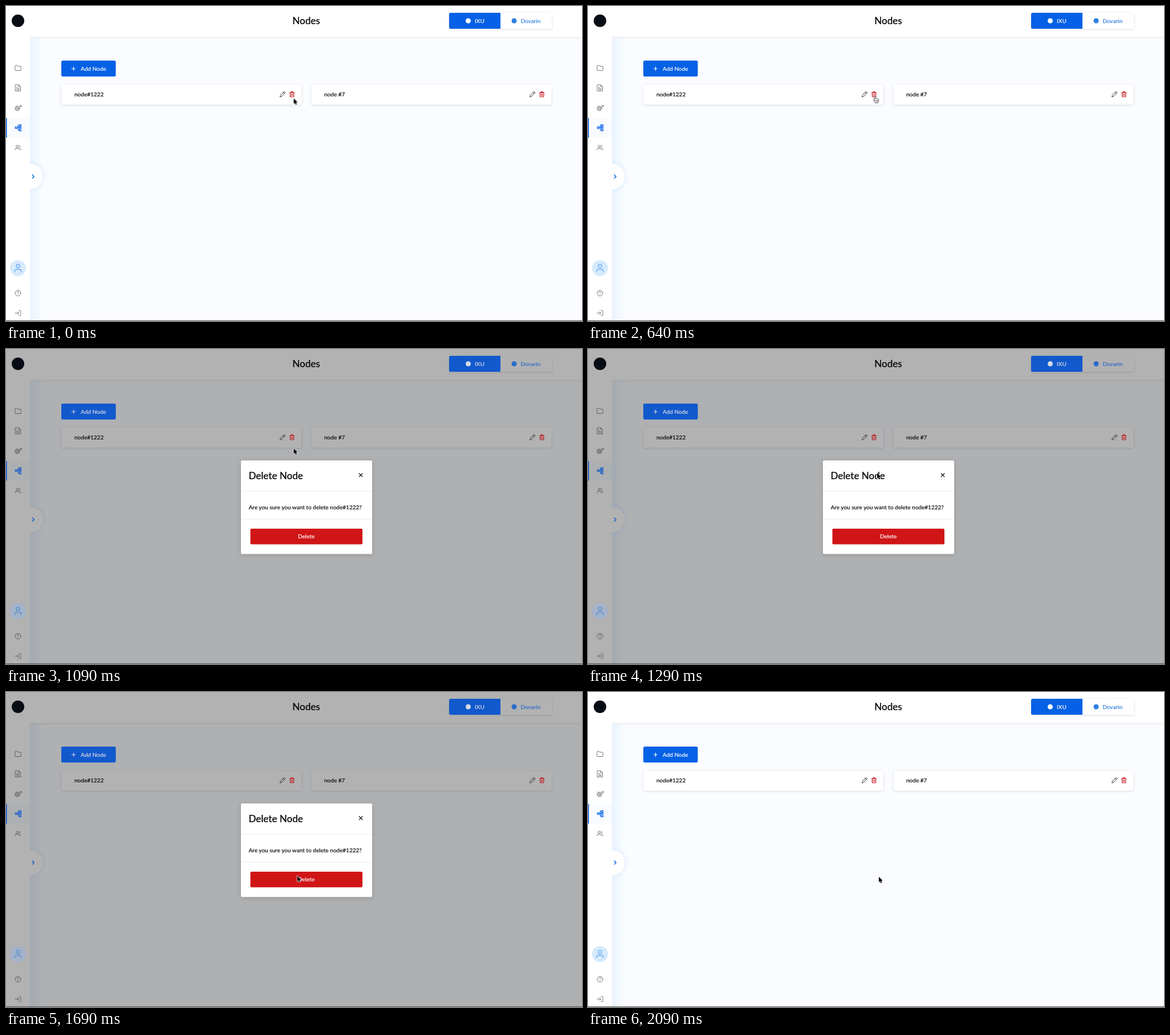
Write an HTML page that moves like this. It is 1010 px wide and 554 px high and loops after 3.64 s.

```html
<!DOCTYPE html>
<html lang="en">
<head>
<meta charset="utf-8">
<title>Nodes</title>
<style>
html, body { margin: 0; width: 100%; height: 100%; overflow: hidden; background: #fafcff; }
svg { display: block; width: 100%; height: 100%; }
#app {
  --blue: #0561e5; --link: #2f80e0; --red: #c60c17; --label: #fff;
  --disc: #d7eafc; --person: #6baef5; --grey: #777;
  animation: tint 3640ms step-end infinite;
}
text { font: 500 10px Lato, "Open Sans", sans-serif; fill: #0b0b0b; stroke: #0b0b0b; stroke-width: .12px; }
text.h { font-size: 17px; stroke-width: .2px; }
text.on { fill: var(--label); stroke: var(--label); }
text.link { fill: var(--link); stroke: var(--link); }
.mid { text-anchor: middle; }
.blue { fill: var(--blue); }
.line { fill: none; stroke: var(--grey); stroke-width: 1; stroke-linecap: round; stroke-linejoin: round; }
.line.b { stroke: var(--blue); }
.panel { fill: #fff; filter: drop-shadow(0 1px 2px rgba(30, 50, 90, .16)); }
#shade, #modal { visibility: hidden; animation: open 3640ms step-end infinite; }
#cursor { animation: move 3640ms linear infinite; }
#arrow { animation: arrow 3640ms step-end infinite; }
#hand { animation: hand 3640ms step-end infinite; }

@keyframes open {
  0%, 57.41%, 100% { visibility: hidden; }
  21.7% { visibility: visible; }
}
@keyframes tint {
  0%, 57.41%, 100% {
    --blue: #0561e5; --link: #2f80e0; --red: #c60c17; --label: #fff;
    --disc: #d7eafc; --person: #6baef5; --grey: #777;
  }
  21.7% {
    --blue: #1259cd; --link: #2c6bcb; --red: #c2121a; --label: #d6dae2;
    --disc: #a2b3ca; --person: #5e8fd0; --grey: #5e5e60;
  }
}
@keyframes arrow {
  0%, 21.7%, 100% { visibility: visible; }
  2.47% { visibility: hidden; }
}
@keyframes hand {
  0%, 21.7%, 100% { visibility: hidden; }
  2.47% { visibility: visible; }
}
@keyframes move {
  0% { transform: translate(504.5px, 162.5px); animation-timing-function: step-end; }
  1.09% { transform: translate(504.5px, 162.5px); animation-timing-function: steps(8, start); }
  12.08% { transform: translate(503.7px, 159.5px); animation-timing-function: step-end; }
  14.83% { transform: translate(503.7px, 159.5px); animation-timing-function: steps(2, start); }
  20.32% { transform: translate(503.5px, 158.8px); animation-timing-function: step-end; }
  29.94% { transform: translate(504.5px, 174.8px); animation-timing-function: step-end; }
  34.06% { transform: translate(504.5px, 174.8px); animation-timing-function: steps(2, start); }
  36.81% { transform: translate(507px, 218px); animation-timing-function: steps(3, start); }
  40.93% { transform: translate(513px, 309px); animation-timing-function: steps(2, start); }
  43.68% { transform: translate(511.5px, 320px); animation-timing-function: steps(4, start); }
  49.17% { transform: translate(510.5px, 324.5px); animation-timing-function: step-end; }
  50.54%, 100% { transform: translate(510px, 325px); }
}
</style>
</head>
<body>
<svg id="app" viewBox="0 0 1010 554">
  <defs>
    <linearGradient id="glow">
      <stop offset="0" stop-color="#e9f3ff"/>
      <stop offset="1" stop-color="#fafcff"/>
    </linearGradient>
    <linearGradient id="under" x2="0" y2="1">
      <stop offset="0" stop-color="#edeff2"/>
      <stop offset="1" stop-color="#edeff2" stop-opacity="0"/>
    </linearGradient>
    <g id="tools">
      <path class="line" style="stroke:#333" d="M.6 9.4l.7-2.9L7.2.7q.6-.5 1.2 0l.9.9q.5.6 0 1.2L3.5 8.6zM6.2 1.7l2.1 2.1"/>
      <path class="line" style="stroke:var(--red);stroke-width:1.1" d="M17.5 2.3h8M19.8 2V.7h3.4V2M18.3 2.5v6q0 1 1 1h4.4q1 0 1-1v-6M20.5 4.6v2.8M22.5 4.6v2.8"/>
    </g>
  </defs>

  <!-- surfaces -->
  <rect width="1010" height="554" fill="#fafcff"/>
  <rect x="42" y="54" width="22" height="500" fill="url(#glow)"/>
  <rect x="42" width="968" height="54" fill="#fff"/>
  <rect x="42" y="54" width="968" height="5" fill="url(#under)"/>
  <circle cx="42" cy="300" r="22.5" fill="#fff" style="filter:drop-shadow(0 0 4px #d3e6fb)"/>
  <rect width="42" height="554" fill="#fff"/>
  <rect y="197" width="42" height="34.5" fill="#f8fbff"/>
  <rect class="panel" x="777" y="12" width="180" height="28" rx="2.5"/>
  <rect class="panel" x="97" y="138.5" width="421" height="35" rx="2"/>
  <rect class="panel" x="535.5" y="138.5" width="421" height="35" rx="2"/>
  <rect id="shade" width="1010" height="554" opacity=".3"/>

  <!-- sidebar -->
  <circle cx="21" cy="26" r="11" fill="#080c14"/>
  <path class="line" d="M15.8 105.3q0-1 1-1h2.7l1.3 1.6h4.4q1 0 1 1v5.6q0 1-1 1h-8.4q-1 0-1-1z"/>
  <path class="line" d="M16.5 138.7h6l3 3v7.8h-9zM22.3 138.7v3.2h3.2M18.5 143.2h2M18.5 145.2h5M18.5 147.2h5"/>
  <g class="line">
    <circle cx="20" cy="180" r="3.2"/>
    <circle cx="20" cy="180" r="1.1"/>
    <circle cx="20" cy="180" r="4.2" stroke-width="1.4" stroke-linecap="butt" stroke-dasharray="1.5 1.8"/>
    <circle cx="26" cy="176" r="1.4"/>
  </g>
  <rect class="blue" y="197" width="1.5" height="34.5"/>
  <path class="line b" stroke-width="1.2" style="stroke-width:1.2" d="M16.4 212.4h3v3h-3zM19.4 213.9h3.8M23.2 209.7h-1.7v8.8h1.7M23.4 208.5h3v2.6h-3zM23.4 212.6h3v2.6h-3zM23.4 217h3v2.6h-3z"/>
  <g class="line">
    <circle cx="19.6" cy="246.8" r="2"/>
    <path d="M16 253v-.8q0-2 2-2h3.2q2 0 2 2v.8M23 244.9q1.6.5 1.6 2t-1.6 2M24.3 250.3q1.7.4 1.7 2v.7"/>
  </g>
  <path class="line b" style="stroke-width:1.5" d="M46.2 297l3 3-3 3"/>
  <circle cx="21" cy="461" r="14" style="fill:var(--disc)"/>
  <g class="line" style="stroke:var(--person);stroke-width:1.4">
    <circle cx="21" cy="457.2" r="3"/>
    <path d="M15.2 467.5v-1.2q0-3 3-3h5.6q3 0 3 3v1.2"/>
  </g>
  <g class="line">
    <circle cx="21" cy="505" r="5"/>
    <path d="M19.5 503.7q.1-1.4 1.5-1.4t1.5 1.3q0 .9-1.5 1.7M21 507.4v.1"/>
    <path d="M16 540h6.3M20 537.6l2.4 2.4-2.4 2.4M22.7 535.5h2.2q1 0 1 1v7q0 1-1 1h-2.2"/>
  </g>

  <!-- header and cards -->
  <text class="h mid" x="526.5" y="32">Nodes</text>
  <path class="blue" d="M779.5 12H867v28h-87.5a2.5 2.5 0 0 1-2.5-2.5v-23a2.5 2.5 0 0 1 2.5-2.5z"/>
  <circle cx="810.5" cy="26" r="4.5" style="fill:var(--label)"/>
  <text class="on" x="822" y="30">IXU</text>
  <circle cx="891" cy="26" r="4.5" style="fill:var(--link)"/>
  <text class="link" x="902.5" y="30">Dovarin</text>
  <rect class="blue" x="97" y="96" width="95.5" height="28" rx="2.5"/>
  <path class="line" style="stroke:var(--label);stroke-width:1.1" d="M115.3 110.2h6.4M118.5 107v6.4"/>
  <text class="on" x="131" y="114">Add Node</text>
  <text x="120" y="159.4">node#1222</text>
  <text x="558" y="159.4">node #7</text>
  <use href="#tools" x="480" y="150.2"/>
  <use href="#tools" x="918.2" y="150.2"/>
  <rect y="553" width="1010" height="1" fill="#555"/>

  <g id="modal">
    <rect x="412" y="196" width="230" height="164.5" rx="2.5" fill="#fff" style="filter:drop-shadow(0 2px 4px rgba(0,0,0,.12))"/>
    <path d="M412 250h230M412 299.3h230" stroke="#ebebeb"/>
    <text class="h" x="425.5" y="228.5">Delete Node</text>
    <path class="line" style="stroke:#111;stroke-width:1.3" d="M619.3 219l5.6 5.6M624.9 219l-5.6 5.6"/>
    <text x="425.5" y="281.6">Are you sure you want to delete node#1222?</text>
    <rect x="428.5" y="316" width="196.5" height="27.5" rx="2" fill="#d01517"/>
    <text class="mid" x="526.7" y="333" style="fill:#fff;stroke:#fff">Delete</text>
  </g>

  <g id="cursor" stroke-linejoin="round">
    <path id="arrow" d="M0 0V9.8L2.2 7.8 3.7 11.2 5.4 10.4 4 7.1H6.9Z" stroke="#fff" stroke-width="1.3" paint-order="stroke"/>
    <path id="hand" d="M-1 1Q-.9 0 0 0T1 1V4Q2 3.4 2.6 4.3 3.6 3.7 4.2 4.7 5.8 4.4 5.9 6V8.2Q5.7 9.5 4.9 10.2V11.6H.1V10.4L-2.8 6.9Q-3.1 5.8-2 5.8L-1 6.7ZM1.2 7v2M2.8 7v2M4.3 7v2" fill="#fff" stroke="#111" stroke-width=".8"/>
  </g>
</svg>
</body>
</html>
```
